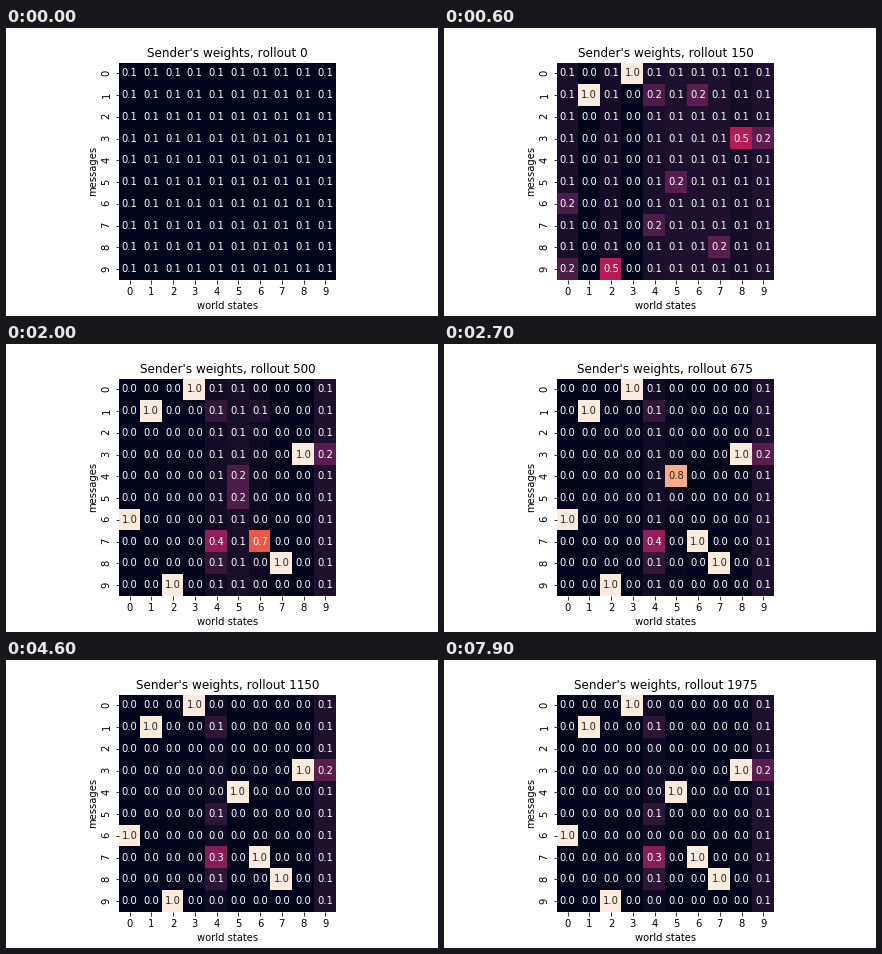
Animation, 432 px wide and 288 px high, one loop 8000 ms. Source, as a matplotlib script:

```python
import numpy as np
import matplotlib.pyplot as plt
from matplotlib.animation import FuncAnimation
from matplotlib.colors import LinearSegmentedColormap

N = 10
FRAMES, INTERVAL = 80, 100
STEP = 25  # rollouts per frame

ROCKET = LinearSegmentedColormap.from_list(
    "rocket_like",
    "#03051a #221331 #4c1d4b #751f58 #a11a5b #cb1b4f "
    "#e83f3f #f26f4d #f69c73 #f7c9aa #faebdd".split(),
)

# state: (message it settles on, frame of onset)
SIGNALS = {0: (6, 5), 1: (1, 1.3), 2: (9, 3), 3: (0, 2),
           5: (4, 10.5), 6: (7, 8.5), 7: (8, 4), 8: (3, 4.7)}

# state: (frame of the first chance reward, messages rewarded in turn)
CHANCE = {0: (2, [9]), 1: (1, [5, 5]), 4: (3, [7, 1, 8, 7, 5]),
          5: (6, [5]), 6: (6, [1]), 8: (3, [3]), 9: (6, [3])}
SPREAD = 1.75  # each chance reward takes this much longer than the last


def weights(frame):
    """Softmax over messages of the rewards collected so far."""
    score = np.zeros((N, N))
    for state, (message, onset) in SIGNALS.items():
        if frame >= onset:
            score[message, state] += 1 + int((frame / onset - 1) ** 3)
    for state, (start, messages) in CHANCE.items():
        for i, message in enumerate(messages):
            score[message, state] += frame >= start * SPREAD ** i
    e = np.exp(score - score.max(axis=0))
    return e / e.sum(axis=0)


def luminance(rgba):
    rgb = rgba[..., :3]
    lin = np.where(rgb <= 0.03928, rgb / 12.92, ((rgb + 0.055) / 1.055) ** 2.4)
    return lin @ np.array([0.2126, 0.7152, 0.0722])


plt.rcParams.update({"font.family": "DejaVu Sans", "font.size": 10,
                     "text.kerning_factor": 6})
fig, ax = plt.subplots(figsize=(6, 4), dpi=72)
fig.subplots_adjust(left=0.125, right=0.9, bottom=0.125, top=0.88)

mesh = ax.pcolormesh(weights(0), cmap=ROCKET, snap=False)
ax.set(xlim=(0, N), ylim=(N, 0), aspect="equal",
       xlabel="world states", ylabel="messages")
ax.spines[:].set_visible(False)

ticks = np.arange(N) + 0.5
ax.set_xticks(ticks, range(N))
ax.set_yticks(ticks, range(N), rotation="vertical")
title = ax.set_title("")
labels = [ax.text(x, y, "", ha="center", va="center")
          for y in ticks for x in ticks]


def update(frame):
    w = weights(frame)
    mesh.set_array(w)
    mesh.set_clim(w.min(), w.max())
    lum = luminance(mesh.to_rgba(w))
    for label, value, light in zip(labels, w.flat, lum.flat):
        label.set_text(f"{value:.1f}")
        label.set_color(".15" if light > 0.408 else "w")
    title.set_text(f"Sender's weights, rollout {frame * STEP}")
    return [mesh, title, *labels]


anim = FuncAnimation(fig, update, frames=FRAMES, interval=INTERVAL,
                     repeat=True, repeat_delay=0, blit=False)
plt.show()
```
